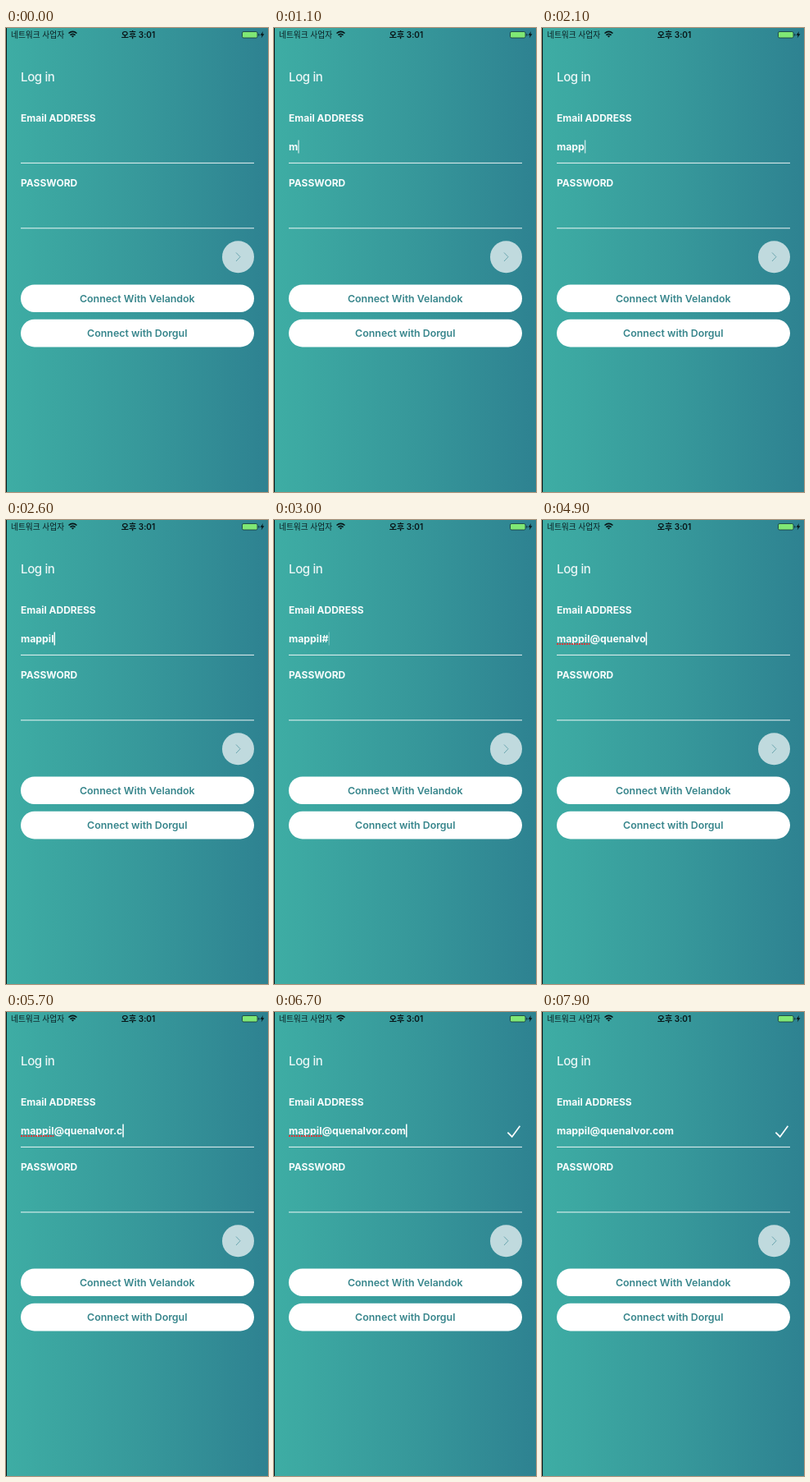
Animation of 320 by 565 pixels, one loop 8 s. Source, as an HTML page:

```html
<!DOCTYPE html>
<html lang="ko">
<head>
<meta charset="utf-8">
<title>Log in</title>
<style>
  html, body { margin: 0; width: 100%; height: 100%; overflow: hidden; }
  svg { display: block; width: 320px; height: 565px; font-family: Inter, "Noto Sans CJK KR", "Noto Sans CJK", sans-serif; }
  .field { fill: #f8fcfc; font-weight: 700; }
  .pill { fill: #fff; }
  .link { fill: #38868c; font-size: 12.4px; font-weight: 600; text-anchor: middle; }
  .line { fill: none; stroke: #fff; }
  .status { font-family: "Noto Sans CJK KR", "Noto Sans CJK", sans-serif; }
</style>
</head>
<body>
<svg viewBox="0 0 320 565">
  <defs>
    <linearGradient id="sea">
      <stop offset="0" stop-color="#3eada4"/>
      <stop offset=".5" stop-color="#37999b"/>
      <stop offset="1" stop-color="#2e8291"/>
    </linearGradient>
  </defs>
  <rect width="320" height="565" fill="url(#sea)"/>
  <rect width="1" height="565" fill="#08181b"/>

  <!-- status bar -->
  <text class="status" x="6" y="11.5" font-size="9.7" fill="#0b1d20">네트워크 사업자</text>
  <g fill="none" stroke="#081416" stroke-width="1.6">
    <path d="M76.5 6.5Q81.5 2.2 86.5 6.5M78.4 8.7Q81.5 6 84.6 8.7"/>
    <path d="M79.7 9.8Q81.5 8.6 83.3 9.8L81.5 11.6Z" fill="#081416" stroke="none"/>
  </g>
  <text x="161.5" y="11.6" font-size="10" font-weight="600" text-anchor="middle" fill="#081416">오후 3:01</text>
  <rect x="288.5" y="4.5" width="18.5" height="7.5" rx="1.6" fill="#7fe875" stroke="#123437" stroke-width=".8"/>
  <path d="M308.3 6.7v3q1.2-.3 1.2-1.5t-1.2-1.5Z" fill="#123437"/>
  <path d="M314 4l-3.4 4.7h2.1l-.9 3.6 3.6-5h-2.2Z" fill="#081416"/>

  <!-- form -->
  <text x="18" y="65" font-size="15" font-weight="500" letter-spacing="-.35" fill="#eaf6f6">Log in</text>
  <text class="field" x="18" y="114" font-size="12">Email ADDRESS</text>
  <text class="field" x="18" y="193" font-size="12">PASSWORD</text>
  <text class="field" id="email" x="18" y="149" font-size="12.3"></text>
  <path id="spell" d="M18 151H58.5" stroke="#d8393c" stroke-width="2" stroke-dasharray="2 1"/>
  <rect id="caret" y="136.5" width="1.5" height="16" fill="#fff"/>
  <path class="line" id="tick" d="M285.4 146.6L290.7 151.9L300.4 138.7" stroke-width="1.7"/>
  <path class="line" d="M18 164.4H303M18 243.8H303" stroke-width=".9"/>

  <circle cx="283.5" cy="278.7" r="19.5" fill="#c0dade"/>
  <path d="M281 273.5L286 278.7L281 284" fill="none" stroke="#6ba5ae"/>
  <rect class="pill" x="18" y="312.4" width="285" height="33.6" rx="16.8"/>
  <rect class="pill" x="18" y="354.8" width="285" height="33.6" rx="16.8"/>
  <text class="link" x="160.3" y="333.5">Connect With Velandok</text>
  <text class="link" x="160.3" y="376">Connect with Dorgul</text>
</svg>
<script>
  const LOOP = 8000, BLUR = 7600;
  const NAME = "mappil", ADDRESS = NAME + "@quenalvor.com";
  const [email, spell, caret, tick] = ["email", "spell", "caret", "tick"].map(id => document.getElementById(id));
  const clamp = v => Math.max(0, Math.min(1, v));
  const show = (el, on) => el.setAttribute("opacity", +on);

  // When each character of the address is typed
  const keys = [1000, 1300, 1600, 2000, 2300, 2500, 3400, 3600, 3800, 4000,
                4200, 4400, 4500, 4700, 4900, 5100, 5500, 5700, 5900, 6100];

  function typed(t) {
    if (t >= 2900 && t < 3200) return NAME + "#"; // mistyped, then erased
    return ADDRESS.slice(0, keys.filter(k => k <= t).length);
  }

  function caretAlpha(t) {
    if (t < 200 || t >= BLUR) return 0;
    if (t >= 3400 && t < 6500) return 1;
    const phase = (t + 60) % 1000;
    return Math.min(clamp(phase / 240), clamp((920 - phase) / 150));
  }

  function draw(now) {
    const t = now % LOOP;
    const text = typed(t);
    if (email.textContent !== text) email.textContent = text;
    caret.setAttribute("x", 18 + (text ? email.getComputedTextLength() : 0));
    show(caret, caretAlpha(t));
    show(spell, t >= 3400 && t < BLUR);
    show(tick, t >= 5900);
  }

  const start = performance.now();
  function loop() {
    draw(performance.now() - start);
    requestAnimationFrame(loop);
  }
  loop();
</script>
</body>
</html>
```
